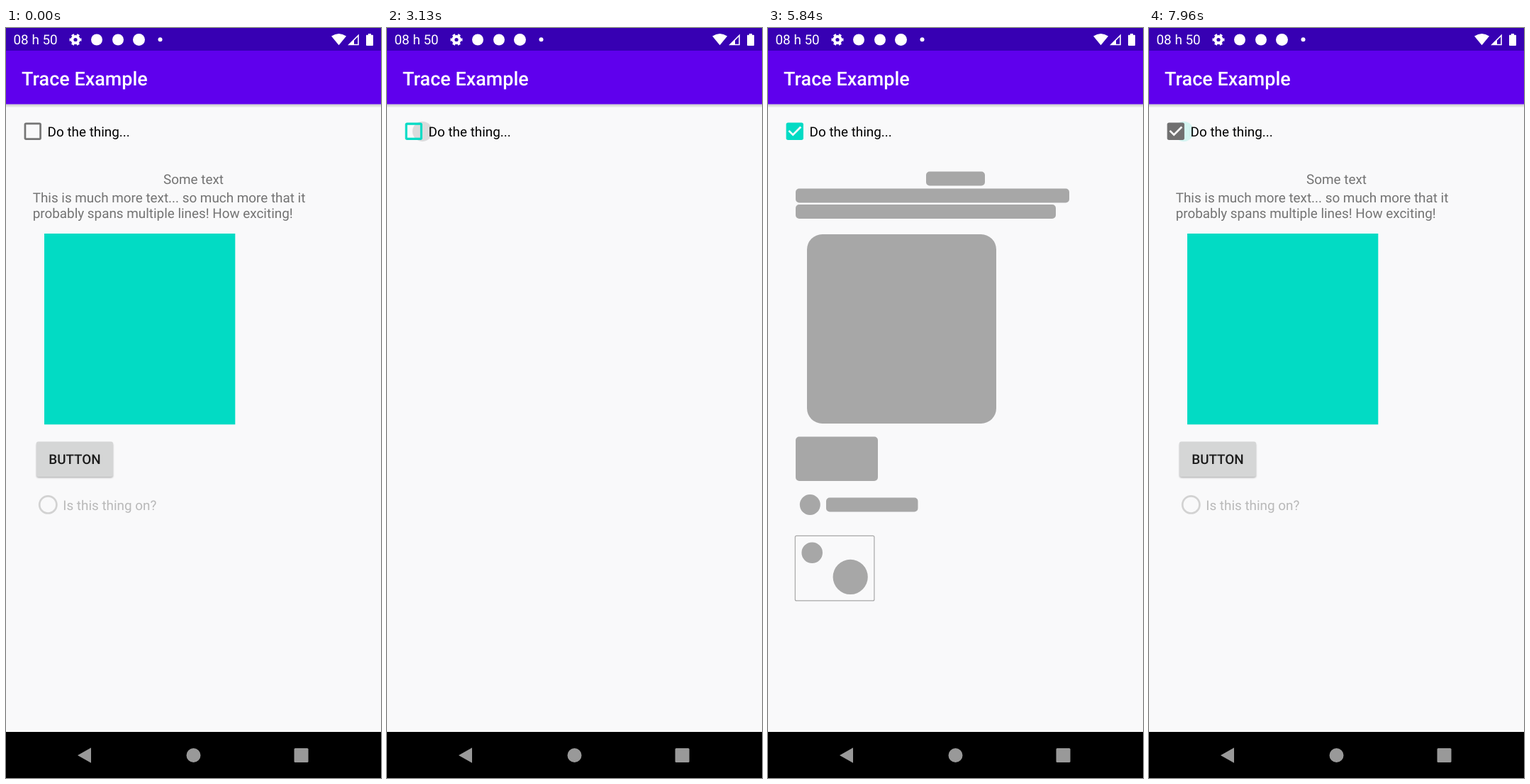
These frames come from a looping animation (529x1058 px, 8000 ms). An HTML page:

```html
<!DOCTYPE html>
<html lang="en">
<head>
<meta charset="utf-8">
<title>Trace Example</title>
<style>
  html, body { margin: 0; width: 100%; height: 100%; overflow: hidden; background: #f9f9fa; }
  svg { display: block; width: 529px; height: 1058px; }
  text { font: 18.86px Roboto, sans-serif; text-rendering: geometricPrecision; }
  .medium { font-weight: 500; }
  .title { font-size: 26.94px; }

  .content, .skeleton, .glow, .ripple, .edge, .tick { animation: 8s linear infinite; }

  .content { animation-name: content; animation-timing-function: step-end; }
  @keyframes content {
    0%, 99.375% { opacity: 1; }
    38.875% { opacity: 0; }
  }

  .skeleton { animation-name: skeleton; }
  @keyframes skeleton {
    0%, 39.6% { opacity: 0; }
    42.1%, 99.374% { opacity: 1; }
    99.375%, 100% { opacity: 0; }
  }

  /* One sweep takes 1040 ms, 13% of the loop */
  .glow { animation-name: glow; }
  @keyframes glow {
    0%, 34%, 47%, 60%, 73%, 86%, 99% { transform: translateX(-161px); }
    46.999%, 59.999%, 72.999%, 85.999%, 98.999% { transform: translateX(567px); }
    100% { transform: translateX(-105px); }
  }

  .ripple { animation-name: ripple; }
  @keyframes ripple {
    0%, 38.1% { opacity: 0; fill: #000; transform: translate(52px, 146px) scale(.5); }
    38.101% { opacity: .12; transform: translate(52px, 146px) scale(.5); }
    39.125% { transform: translate(50px, 146px) scale(1); }
    41.5% { opacity: .12; transform: translate(38px, 146px) scale(1.92); }
    44% { opacity: 0; fill: #000; transform: translate(38px, 146px) scale(1.92); }
    98.9% { opacity: 0; fill: #02dbc4; transform: translate(52px, 146px) scale(.5); }
    98.901% { opacity: .15; fill: #02dbc4; }
    99.5% { transform: translate(49px, 146px) scale(1); }
    100% { opacity: .15; fill: #02dbc4; transform: translate(46px, 146px) scale(1.35); }
  }

  /* The outline thickens inwards until it fills the box */
  .edge { animation-name: edge; }
  @keyframes edge {
    0%, 38.874% { stroke: #757575; stroke-width: 5.4px; }
    38.875% { stroke: #02dbc4; }
    39.125% { stroke-width: 6px; }
    41.125% { stroke-width: 25px; }
    99.374% { stroke: #02dbc4; }
    99.375%, 100% { stroke: #707070; stroke-width: 25px; }
  }

  .tick { stroke-dasharray: 1 2; animation-name: tick; }
  @keyframes tick {
    0%, 41.124% { stroke-dashoffset: 1; opacity: 0; }
    41.125% { stroke-dashoffset: 1; opacity: 1; }
    43.125%, 100% { stroke-dashoffset: 0; opacity: 1; }
  }
</style>
</head>
<body>
<svg viewBox="0 0 529 1058">
  <defs>
    <linearGradient id="barShadow" x2="0" y2="1">
      <stop stop-opacity=".2"/>
      <stop offset="1" stop-opacity="0"/>
    </linearGradient>
    <linearGradient id="shine">
      <stop stop-color="#b8b8b8" stop-opacity="0"/>
      <stop offset=".5" stop-color="#b8b8b8"/>
      <stop offset="1" stop-color="#b8b8b8" stop-opacity="0"/>
    </linearGradient>
    <filter id="soft" x="-10%" y="-20%" width="120%" height="140%">
      <feGaussianBlur stdDeviation="1.3"/>
    </filter>
    <clipPath id="box"><rect x="25.6" y="133.6" width="24.3" height="24.3" rx="2.7"/></clipPath>
    <clipPath id="bones">
      <rect x="223" y="202.5" width="83" height="20" rx="5"/>
      <rect x="39" y="226.5" width="386" height="20" rx="5"/>
      <rect x="39" y="249" width="367" height="20" rx="5"/>
      <rect x="55" y="291" width="267" height="267" rx="21.5"/>
      <rect x="39" y="576.5" width="116" height="62.5" rx="5"/>
      <circle cx="59.3" cy="672.4" r="14.5"/>
      <rect x="82" y="662.5" width="129.5" height="20" rx="5"/>
      <circle cx="62.2" cy="740.2" r="14.8"/>
      <circle cx="116.2" cy="774.4" r="24.6"/>
    </clipPath>
  </defs>

  <rect width="529" height="1058" fill="#f9f9fa"/>

  <!-- App bar -->
  <rect y="107.5" width="529" height="5" fill="url(#barShadow)"/>
  <rect width="529" height="107.5" fill="#5f00ed"/>
  <text class="medium title" x="22" y="81" fill="#fff">Trace Example</text>

  <!-- Status bar -->
  <rect width="529" height="32" fill="#3700b3"/>
  <g fill="#fff">
    <text x="10.5" y="23.3" fill="#fff">08 h 50</text>
    <circle cx="98" cy="16.5" r="4.6" fill="none" stroke="#fff" stroke-width="4"/>
    <circle cx="98" cy="16.5" r="7.3" fill="none" stroke="#fff" stroke-width="2.4" pathLength="12" stroke-dasharray="1" stroke-dashoffset=".5"/>
    <circle cx="128" cy="16.5" r="8"/>
    <circle cx="158" cy="16.5" r="8"/>
    <circle cx="187.5" cy="16.5" r="8.5"/>
    <circle cx="217.5" cy="16.3" r="3"/>
    <path d="M469.5 24.2 459 11.5Q469.5 4.5 480 11.5Z"/>
    <path d="M497 10.5V23.5H484Z" fill="none" stroke="#fff" stroke-width="1.6"/>
    <path d="M491 16V24H483Z"/>
    <path d="M511 8h4v1.8h2a1 1 0 0 1 1 1V24a1 1 0 0 1-1 1h-8a1 1 0 0 1-1-1V10.800a1 1 0 0 1 1-1h2Z"/>
  </g>

  <!-- Checkbox -->
  <circle class="ripple" r="14"/>
  <g clip-path="url(#box)" fill="none">
    <rect class="edge" x="25.6" y="133.6" width="24.3" height="24.3" rx="2.7"/>
  </g>
  <path class="tick" d="M29.4 144.9 35.2 150.7 46.3 139.5" pathLength="1" fill="none" stroke="#fafafa" stroke-width="2.7"/>
  <text x="58.6" y="152.7">Do the thing...</text>

  <!-- Loaded content -->
  <g class="content">
    <g fill="#737373">
      <text x="264.5" y="220" text-anchor="middle">Some text</text>
      <text x="37.7" y="246">This is much more text... so much more that it</text>
      <text x="37.7" y="268.300">probably spans multiple lines! How exciting!</text>
    </g>
    <rect x="54" y="290" width="269.300" height="269.300" fill="#02dbc4"/>
    <rect x="43" y="585.5" width="108" height="49" rx="3" opacity=".28" filter="url(#soft)"/>
    <rect x="42.800" y="583.5" width="108.200" height="49.5" rx="2.7" fill="#d5d6d6"/>
    <text class="medium" x="97" y="615.3" text-anchor="middle" fill="#1b1b1b">BUTTON</text>
    <circle cx="59.3" cy="672.4" r="12.1" fill="none" stroke="#d2d2d2" stroke-width="2.7"/>
    <text x="80.3" y="680" fill="#b9b9b9">Is this thing on?</text>
  </g>

  <!-- Loading placeholder -->
  <g class="skeleton">
    <g clip-path="url(#bones)">
      <rect width="529" height="993" fill="#a7a7a7"/>
      <rect class="glow" x="-85" y="190" width="170" height="620" fill="url(#shine)"/>
    </g>
    <rect x="38.3" y="716.3" width="111.6" height="91.6" rx="2" fill="none" stroke="#a7a7a7" stroke-width="1.2"/>
  </g>

  <!-- Navigation bar -->
  <rect y="993" width="529" height="65"/>
  <g fill="#999">
    <path d="M101 1026 120 1015.300V1036.700Z"/>
    <circle cx="264.5" cy="1026" r="10"/>
    <rect x="406.5" y="1016" width="20" height="20" rx="1.5"/>
  </g>
</svg>
</body>
</html>
```
